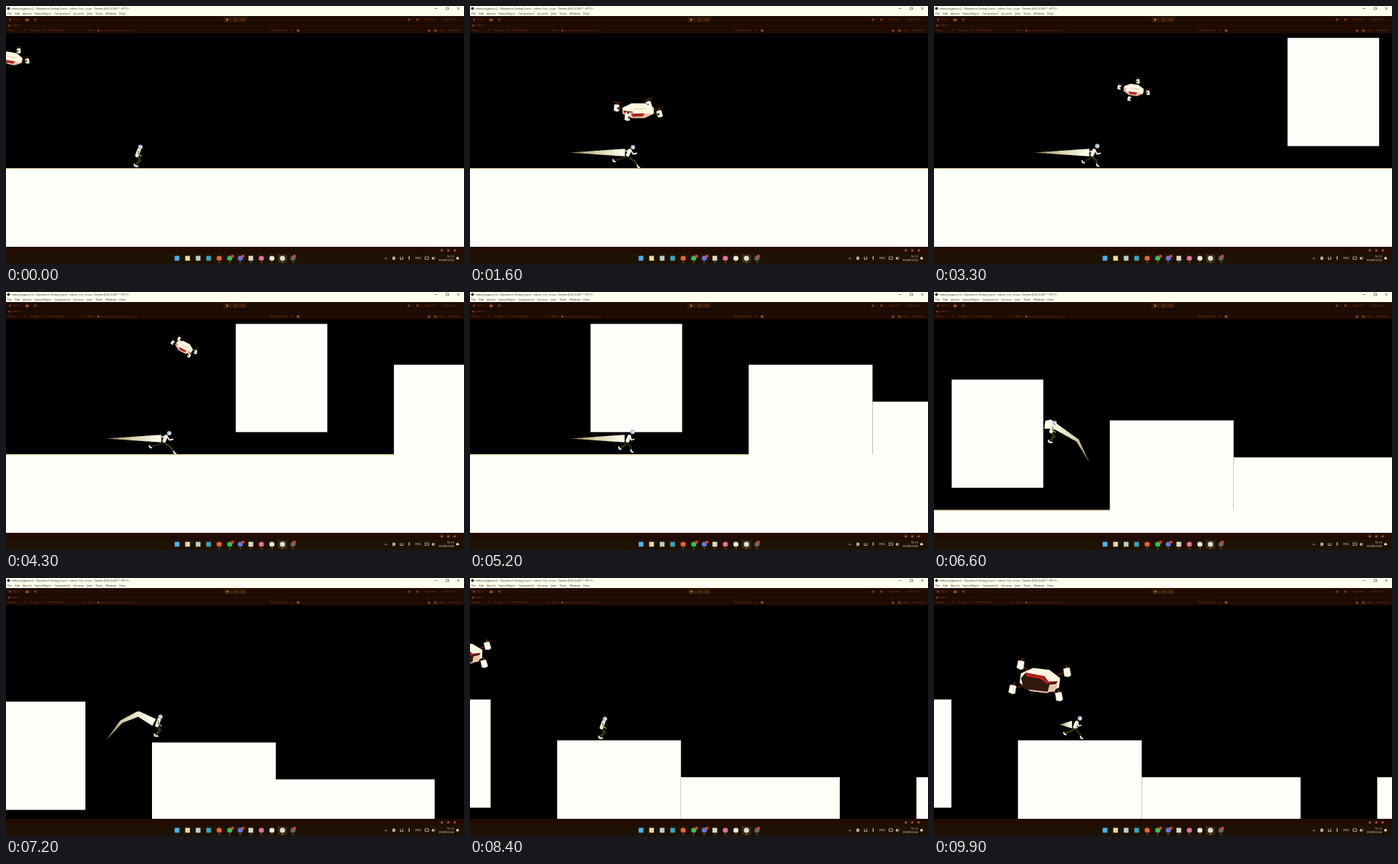
These frames come from a looping animation (640x360 px, 10 s). An HTML page with a canvas:

```html
<!DOCTYPE html>
<html lang="en">
<head>
<meta charset="utf-8">
<title>Movement Testing Scene</title>
<style>
html, body { margin: 0; width: 100%; height: 100%; overflow: hidden; background: #000; }
canvas { display: block; width: 640px; height: 360px; }
</style>
</head>
<body>
<canvas id="stage"></canvas>
<script>
const canvas = document.getElementById('stage');
const dpr = window.devicePixelRatio || 1;
canvas.width = 640 * dpr;
canvas.height = 360 * dpr;
const g = canvas.getContext('2d');

const LOOP = 10000, STEP = 100;
const WHITE = '#fffffa', CREAM = '#fffff0', DARK = '#200c02', RUST = '#7c3a10', INK = '#24221a', PALE = '#e6dfc8';
const FONT = '"Open Sans", "Noto Sans", sans-serif';
const HOME_X = 184, GROUND_Y = 226.5, LAG = 0.225, TRAIL = 0.45;

// Runner: seconds, distance, height above the ground
const RUN = [
  [0.6, 0, 0], [4.3, 640, 0], [5.95, 918, 0], [6.1, 943, 32],
  [6.3, 920, 75], [6.55, 879, 101], [6.65, 879, 82], [6.75, 900, 105],
  [6.88, 922, 132], [7.03, 946, 143], [7.2, 968, 131], [7.28, 980, 125],
  [7.55, 1023, 125], [9.8, 1023, 125], [10, 1058, 125]
];

// Drone: seconds, x, y, half width, roll, two arm angles, tilt
const DRONE = [
  [0, 7, 73, 16, 0.2, 0.3, 1.1, 0.5],
  [1.1, 85, 122, 20, 0.1, 0.4, 1.1, 0.35],
  [1.6, 235, 146, 22, 0, 0.43, 1.1, 0.3],
  [2.5, 295, 140, 17, 0, 0.35, 1.2, 0.45],
  [3.3, 279, 117, 14, 0.15, 0.3, 1.28, 0.6],
  [4.3, 249, 77, 12.5, 0.5, 0.55, 1.95, 0.67],
  [4.9, 225, 20, 11, 0.4, 0.6, 1.9, 0.6],
  [7.8, -70, 90, 24, 0, 0.7, 0.6, 0.5],
  [9.9, 148, 143, 28, 0.12, 0.88, 0.43, 0.68]
];

// Left, right, top, bottom in world units
const BLOCKS = [
  [-900, 1291, 0, -160], [739, 867, 182, 31], [960, 1133, 125, -20],
  [1133, 1355, 73.5, -79], [1462, 1760, 73.5, -79]
];

function sample(keys, t) {
  let i = 1;
  while (i < keys.length - 1 && keys[i][0] < t) i++;
  const a = keys[i - 1], b = keys[i];
  const k = Math.max(0, Math.min(1, (t - a[0]) / (b[0] - a[0])));
  return a.slice(1).map((v, j) => v + (b[j + 1] - v) * k);
}

// The camera trails the runner with a constant lag
const camera = [[0, 0]];
for (let i = 1; i <= 1000; i++) {
  const pos = sample(RUN, i / 100), k = 1 - Math.exp(-0.01 / LAG);
  camera.push(camera[i - 1].map((c, j) => c + (pos[j] - c) * k));
}

function rect(x, y, w, h, color) {
  g.fillStyle = color;
  g.fillRect(x, y, w, h);
}
function dot(x, y, r, color) {
  g.fillStyle = color;
  g.beginPath();
  g.arc(x, y, r, 0, 7);
  g.fill();
}
function text(s, x, y, color, align = 'left', size = 4) {
  g.font = size + 'px ' + FONT;
  g.textAlign = align;
  g.textBaseline = 'middle';
  g.fillStyle = color;
  g.fillText(s, x, y);
}
function poly(points, color) {
  g.fillStyle = color;
  g.beginPath();
  points.forEach(p => g.lineTo(p[0], p[1]));
  g.closePath();
  g.fill();
}
function line(points, width, color) {
  g.strokeStyle = color;
  g.lineWidth = width;
  g.lineCap = g.lineJoin = 'round';
  g.beginPath();
  points.forEach(p => g.lineTo(p[0], p[1]));
  g.stroke();
}

function drawBlocks(toScreen) {
  for (const [l, r, top, bottom] of BLOCKS) {
    const [x, y] = toScreen(l, top), [x2, y2] = toScreen(r, bottom);
    rect(x, y, x2 - x, y2 - y, WHITE);
  }
  const [x, y] = toScreen(-900, 0), [x2] = toScreen(BLOCKS[2][0], 0);
  rect(x, y - 0.5, x2 - x, 0.8, '#c9a05c');
}

function drawTrail(t, toScreen) {
  const pts = [], dist = [];
  let total = 0;
  for (let i = 0; i <= 30; i++) {
    const [w, h] = sample(RUN, Math.max(0, t - TRAIL + TRAIL * i / 30));
    const [x, y] = toScreen(w - 5, h + 22);
    const last = pts[pts.length - 1];
    const d = last ? Math.hypot(x - last[0], y - last[1]) : 0;
    if (last && d < 0.2) continue;
    total += d;
    pts.push([x, y]);
    dist.push(total);
  }
  if (total < 3) return;
  const left = [], right = [];
  pts.forEach((p, i) => {
    const a = pts[Math.max(0, i - 1)], b = pts[Math.min(pts.length - 1, i + 1)];
    const dx = b[0] - a[0], dy = b[1] - a[1];
    const k = 5.3 * dist[i] / total / (Math.hypot(dx, dy) || 1);
    left.push([p[0] - dy * k, p[1] + dx * k]);
    right.unshift([p[0] + dy * k, p[1] - dx * k]);
  });
  const fill = g.createLinearGradient(...pts[0], ...pts[pts.length - 1]);
  fill.addColorStop(0, '#77704a');
  fill.addColorStop(0.45, '#d2cda4');
  fill.addColorStop(1, CREAM);
  poly(left.concat(right), fill);
}

function leg([hx, hy], [fx, fy], bend, color) {
  line([[hx, hy], [(hx + fx) / 2 + bend, (hy + fy) / 2], [fx, fy]], 2.6, color);
  line([[fx - 0.8, fy - 1.6], [fx, fy + 0.8], [fx + 2.2, fy + 1.2]], 2, '#e4e8ee');
}

function drawHead(x, y) {
  dot(x, y, 3.1, '#a9bfd2');
  dot(x + 0.9, y + 0.4, 1.6, '#d9e5ec');
}

function drawRunner(t, toScreen) {
  const [w, h] = sample(RUN, t), next = sample(RUN, t + 0.02), prev = sample(RUN, t - 0.02);
  const vx = next[0] - prev[0], vy = next[1] - prev[1];
  const pants = '#3b3615', shade = '#29250e', skin = '#f4f4e4';
  g.save();
  g.translate(...toScreen(w, h));
  if (vx < -0.3) g.scale(-1, 1);
  const falling = t > 7.03 && vy < -0.3;
  if (falling || Math.abs(vx) < 0.3) {
    const hip = [-1, -18];
    leg(hip, [-2, -4], 6, shade);
    leg(hip, [-4, -4], 5, pants);
    line([[2, -26], hip], 5, skin);
    line([[1, -24], [1, -20], [5, -17]], 1.8, '#8f8c55');
    drawHead(3.8, -30);
  } else {
    const airborne = h > 0.5 && t < 7.2;
    const a = airborne ? 0 : (t - 1.6) / 0.54 * 2 * Math.PI;
    const c = Math.cos(a), bob = 1.2 * Math.cos(2 * a), hip = [-2, -17];
    const foot = k => [17 * k - 4, 4 * k - 6.5];
    line([[1, -25], [-3 - 2 * c, -21 - 3 * c], [-1 - 5 * c, -21 - 5 * c]], 1.8, '#c9c8b4');
    leg(hip, foot(-c), 2.5, shade);
    leg(hip, foot(c), 3, pants);
    line([[1.5, -25], [-1, -19]], 5, skin);
    line([[3, -25], [5 + 1.5 * c, -20], [9 + 2 * c, -21]], 1.8, skin);
    drawHead(6, bob - 30.7);
  }
  g.restore();
}

function drawPod(x, y, s, roll, below) {
  g.save();
  g.translate(x, y);
  g.rotate(roll);
  g.scale(s, s);
  if (!below) line([[-6, -7], [6, -7.6]], 1.4, '#4a2510');
  rect(-1.2, -7.5, 2.4, 4, '#5a2a16');
  poly([[-4, -4], [3, -4.5], [4, 4], [1, 5.5], [-3.5, 4.5]], '#fffcea');
  if (!below) rect(x < 0 ? 1 : -3, -1, 2.6, 3, '#38180c');
  g.restore();
}

function drawDrone(t) {
  if (t > 4.9 && t < 7.8) return;
  const [x, y, bw, roll, a, b, tilt] = sample(DRONE, t);
  const bh = bw * (0.4 + 0.3 * tilt), s = bw / 22, r = bw * 1.5, below = t > 7.8;
  const ax = r * Math.cos(a), ay = r * tilt * Math.sin(a);
  const bx = r * Math.cos(b), by = -r * tilt * Math.sin(b);
  const pods = [[bx, by], [-ax, -ay], [ax, ay], [-bx, -by]];
  const pod = (p, i) => drawPod(p[0], p[1], s, roll + (i % 2 ? 0.15 : -0.2), below);
  const shape = (pts, color) => poly(pts.map(p => [p[0] * bw, p[1] * bh]), color);
  g.save();
  g.translate(x, y);
  pods.forEach(p => line([[0, 0], p], 2 * s, '#4a1a10'));
  pods.slice(0, 2).forEach(pod);
  g.save();
  g.rotate(roll);
  const hull = [], belly = [];
  for (let i = 0; i < 8; i++) {
    const q = (i + 0.5) * Math.PI / 4;
    const p = [1.07 * Math.cos(q), 1.04 * Math.sin(q)];
    hull.push(p);
    if (i < 4) belly.push(p);
  }
  shape(hull, '#fff6df');
  shape(belly, '#efb9a4');
  if (below) {
    shape([[-0.95, 0], [-0.75, -0.5], [0.2, -0.4], [0.45, 0.05], [0.9, -0.1], [0.55, 0.85], [-0.75, 0.85]], '#30190c');
    shape([[-0.75, -0.48], [0.15, -0.38], [0.4, 0], [0.9, -0.1], [0.35, 0.2], [0, -0.15], [-0.7, -0.2]], '#b91f1c');
    shape([[0.5, 0.25], [0.9, 0.1], [0.8, 0.75], [0.45, 0.9]], '#efc3a8');
  } else {
    shape([[-0.45, 0.4], [0.4, 0.35], [0.3, 0.75], [-0.35, 0.8]], '#a52a24');
    shape([[-0.95, 0.2], [-0.8, -0.1], [-0.8, 0.5]], '#d84a3c');
    line([[-bw * 0.3, -bh * 0.2], [bw * 0.5, -bh * 0.25]], 0.7, '#cdb89c');
  }
  g.restore();
  pods.slice(2).forEach(pod);
  g.restore();
}

function drawTop() {
  rect(0, 0, 640, 14, CREAM);
  rect(0, 14, 640, 24, DARK);
  rect(0, 23.5, 640, 0.8, '#0c0400');
  rect(0, 30.5, 640, 0.6, '#120600');
  dot(3.5, 3.6, 2, '#222');
  text('redacted-game-v2 - Movement Testing Scene - Lattice, Fen, Linux - Ombra 2022.3.20f1* <RT11>', 7.5, 3.7, INK, 'left', 3.75);
  line([[599.5, 3.5], [602.5, 3.5]], 0.6, '#333');
  g.strokeRect(615.5, 2, 3, 3);
  line([[630.5, 2], [633.5, 5]], 0.6, '#333');
  line([[633.5, 2], [630.5, 5]], 0.6, '#333');
  let x = 2;
  for (const name of 'File Edit Assets GameObject Component Services Jobs Tools Window Help'.split(' ')) {
    text(name, x, 11, INK);
    x += g.measureText(name).width + 4.2;
  }

  [5.5, 41, 563, 575].forEach(x => dot(x, 19, 1.7, RUST));
  text('DS ▾', 10, 19, RUST);
  dot(29, 19.2, 2, '#a04c18');
  dot(31, 19.6, 1.4, '#a04c18');
  rect(304, 15.5, 32, 7, '#321a08');
  poly([[308, 17], [311.5, 19], [308, 21]], '#8c9440');
  [319, 321, 332].forEach(x => rect(x, 17.3, 1, 3.5, RUST));
  poly([[329, 17.2], [332, 19], [329, 20.8]], RUST);
  text('Layers ▾', 584, 19, RUST);
  text('Layout ▾', 611, 19, RUST);

  rect(3, 26, 3, 2.6, RUST);
  text('Game', 8, 27.4, RUST);
  const y = 34.3;
  const labels = { Game: 2, 'Display 1': 33, 'Free Aspect': 59, Scale: 114, '1x': 179, 'Play Focused': 369, Stats: 605, 'Gizmos ▾': 618 };
  for (const name in labels) text(name, labels[name], y, RUST);
  [25, 53, 107, 399].forEach(x => text('▾', x, y, RUST));
  rect(128, 34, 50, 0.7, '#5c2a0c');
  dot(129, y, 1.2, '#b05a22');
  rect(406.5, 32.6, 3.5, 3.2, '#94501e');
  dot(591, y, 1.6, '#a04c18');
  rect(598, 32.8, 4, 3, RUST);
}

function drawBottom() {
  rect(0, 336, 640, 10, '#220c02');
  rect(0, 345.5, 640, 14.5, '#1e1205');
  [609, 618, 627].forEach(x => dot(x, 341, 1.7, '#a8551e'));

  rect(380, 346.5, 12.5, 11.5, '#3a2c18');
  const icons = '#48b5ec #e6d8a8 #b8ccc8 #3ca4b8 #f06030 #38bd58 #6672dc #ded9c0 #e0709c #e8e6d8 #e0e0cc #69655a'.split(' ');
  icons.forEach((color, i) => {
    const x = 239 + 14.73 * i;
    if (i < 4 || i === 7) rect(x - 3.3, 348.6, 6.6, 6.8, color);
    else dot(x, 352, 3.6, color);
    if (i > 3) rect(x - 1.5, 357.6, 3, 0.7, i === 10 ? '#d59a50' : '#87806a');
  });
  [316.5, 331, 403].forEach(x => dot(x, 349.2, 2.1, '#dd4430'));

  line([[529.5, 353], [531, 351.3], [532.5, 353]], 0.7, PALE);
  rect(540, 349.7, 4, 4.5, '#b7aa90');
  line([[551, 350.3], [551, 353.5], [554.5, 353.5], [554.5, 350.3]], 0.8, PALE);
  line([[563.3, 349.5], [563.3, 353.5]], 1.1, PALE);
  text('ENG', 576, 352, PALE, 'center');
  g.strokeStyle = PALE;
  g.lineWidth = 0.7;
  g.strokeRect(586, 350, 4.5, 3.5);
  poly([[594.5, 352], [597.5, 349.5], [597.5, 354.5]], PALE);
  line([[598.8, 350.5], [599.5, 352], [598.8, 353.5]], 0.6, PALE);
  text('15:15', 626, 349.5, PALE, 'right');
  text('03/08/2024', 626, 355, PALE, 'right');
  dot(631, 351.6, 1.6, PALE);
  rect(629, 352, 4, 1.3, PALE);
}

function draw(now) {
  const ms = Math.floor((now % LOOP) / STEP) * STEP, t = ms / 1000;
  const [cx, ch] = camera[ms / 10];
  const toScreen = (x, h) => [HOME_X + x - cx, GROUND_Y + ch - h];
  g.setTransform(dpr, 0, 0, dpr, 0, 0);
  rect(0, 0, 640, 360, '#000');
  g.save();
  g.beginPath();
  g.rect(0, 38, 640, 298);
  g.clip();
  drawBlocks(toScreen);
  drawTrail(t, toScreen);
  drawRunner(t, toScreen);
  drawDrone(t);
  g.restore();
  drawTop();
  drawBottom();
}

const start = performance.now();
function tick() {
  draw(performance.now() - start);
  requestAnimationFrame(tick);
}
tick();
</script>
</body>
</html>
```
